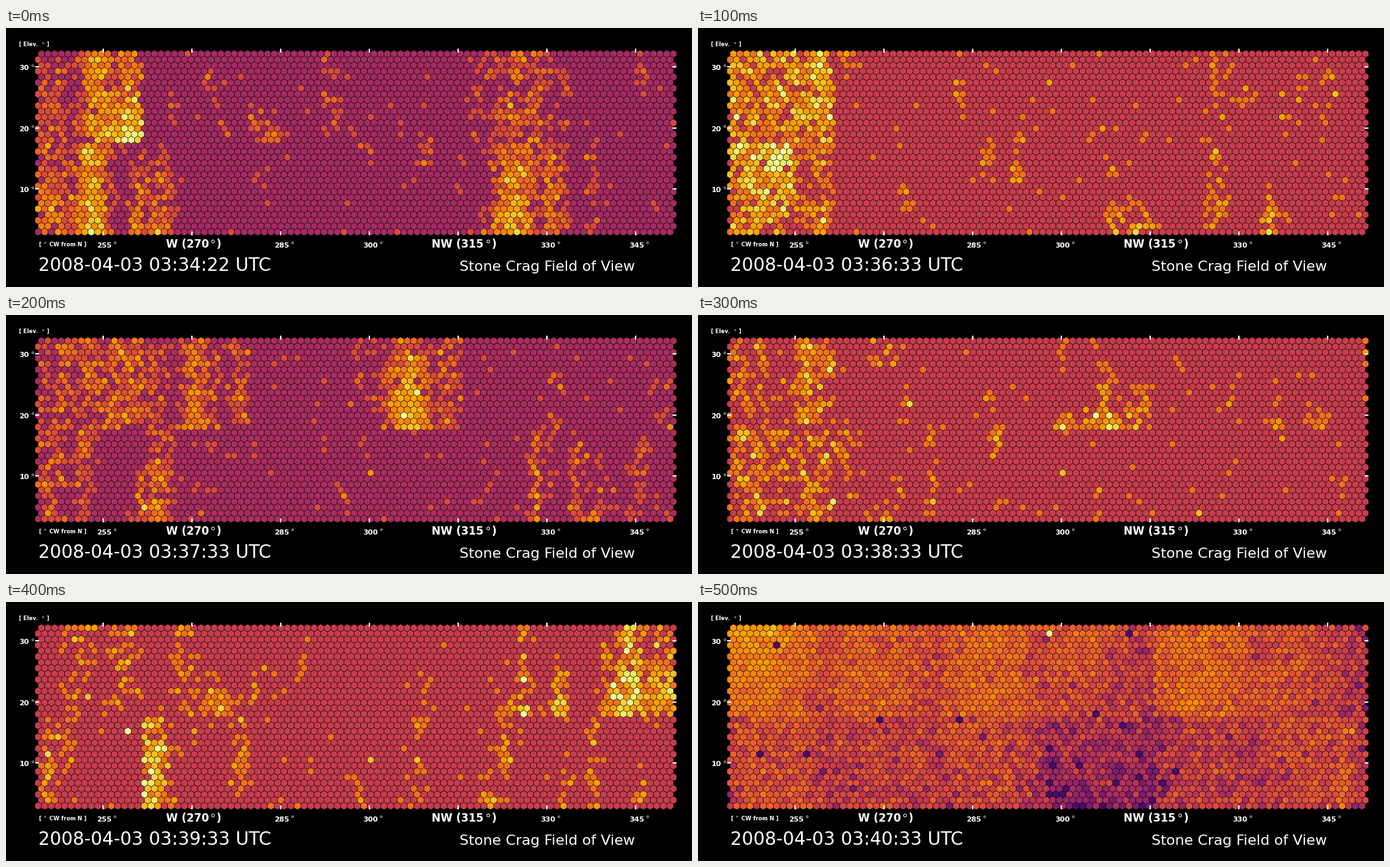
Animation of 1059 by 401 pixels, one loop 600 ms. Source, as a matplotlib script:

```python
import matplotlib.pyplot as plt
import numpy as np
from matplotlib.animation import FuncAnimation
from matplotlib.collections import PolyCollection
from matplotlib.patches import Rectangle

W, H, DPI = 1059, 401, 100
COLS, ROWS, DX, DY = 96, 32, 10.27, 8.89

plt.rcParams["font.family"] = "DejaVu Sans"

col, row = (g.ravel() for g in np.meshgrid(np.arange(COLS), np.arange(ROWS)))
cx = 49.5 + DX * (col + 0.5 * (row % 2 == 0))
cy = 40.1 + DY * row
camera, ring = col // 16, row // 16
depth = row % 16 / 15

scenes = []


def streak(half, x, w, a, b):
    """Band inside one camera, strength a at its top to b at its foot."""
    glow = np.maximum(a + (b - a) * depth, 0) * np.exp(-0.5 * ((cx - x) / w) ** 2)
    return glow * (ring == half) * (camera == int((x - 46) // (16 * DX)))


def wisps(rng, n):
    """Faint short clusters scattered over the field."""
    total = np.zeros(cx.size)
    for x, y in rng.uniform((220, 60), (1030, 310), (n, 2)):
        total += 0.7 * np.exp(-((cx - x) / 9) ** 2 - ((cy - y) / 25) ** 2)
    return total


def scene(clock, base, gain, upper, lower, peaks, sky=0.02, faint=16):
    rng = np.random.default_rng(40 + len(scenes))
    rate = sky + wisps(rng, faint)
    for half, bands in enumerate((upper, lower)):
        for band in bands:
            rate += streak(half, *band)
    count = rng.poisson(rate)
    for x, y, n in peaks:
        count[np.argmin((cx - x) ** 2 + (cy - y) ** 2)] = n
    level = base + gain * np.log(count + 1)
    scenes.append((f"2008-04-03 {clock} UTC", np.minimum(level, 0.985)))


scene("03:34:22", 0.44, 0.2,
      [(143, 14, 4, 4), (190, 15, 2, 6), (190, 17, -12, 8), (65, 20, 0.4, 2),
       (395, 20, -2, 1.5), (500, 12, 0.6, 0.5), (795, 28, 1.7, 1.8), (862, 8, 1, 0.5)],
      [(132, 13, 4, 7), (65, 16, 1.5, 2.8), (100, 15, 0.8, 1.4), (208, 11, 0.5, 3),
       (238, 13, 1, 2.5), (783, 17, 2.5, 7), (846, 12, 2.2, 2.5), (905, 6, 1, 1)],
      [(404, 218, 1), (378, 138, 3)])

scene("03:36:33", 0.53, 0.23,
      [(60, 18, 1.4, 1.4), (130, 20, 2.4, 0.8), (192, 15, 2.8, 2.2),
       (163, 16, 1.6, 0.6), (95, 14, 0.5, 0.9), (228, 8, 1, -1), (800, 14, 0.4, 0.4)],
      [(65, 20, 2, 1.3), (128, 17, 5, 0.5), (188, 18, 1, 0.9), (95, 16, 1.2, 0.8),
       (680, 18, -2, 1.6), (645, 9, -1, 0.9), (800, 9, 0.3, 0.8), (880, 7, -2, 2.4)],
      [(543, 84, 2), (399, 102, 2), (985, 102, 3), (625, 155, 2)])

scene("03:37:33", 0.45, 0.195,
      [(70, 22, 1.2, 1.1), (130, 17, 1.6, 1.4), (187, 23, 2.1, 1.8), (228, 14, 0.9, 0.9),
       (293, 18, 1.7, 2.3), (362, 9, 1, 1.8), (548, 9, 1.4, -0.5), (630, 13, 4, 8),
       (605, 14, 0.6, 3), (688, 13, 1.6, 1.6), (1014, 8, -0.6, 1.2)],
      [(70, 14, 1.5, 0.9), (116, 13, 2, 0.3), (235, 12, 1.1, 3.5), (208, 6, -1, 3),
       (818, 6, 2.2, 2.4), (877, 8, 1, 1.2), (908, 14, -0.5, 0.9), (973, 10, 0.5, 1.2)],
      [(615, 155, 16), (563, 245, 4), (214, 298, 9)])

scene("03:38:33", 0.53, 0.227,
      [(65, 9, 0.9, 0.9), (96, 9, 0.7, 0.6), (168, 17, 1.5, 0.9), (206, 6, 1.6, 0),
       (290, 16, 1, -0.5), (632, 9, -0.5, 2.4), (612, 25, -6, 2), (680, 11, -0.8, 1),
       (890, 11, -0.3, 0.8), (945, 14, -0.3, 0.7)],
      [(65, 13, 1.5, 0.8), (92, 11, 1, 0.9), (125, 13, 1.2, 0), (172, 16, 1.2, 0.9),
       (202, 9, 0.8, 0.6), (228, 12, 0.9, 0), (285, 15, -2, 1), (359, 7, 0.6, 0.6)],
      [(615, 155, 6), (563, 245, 3), (676, 173, 3), (773, 307, 3)])

scene("03:39:33", 0.53, 0.23,
      [(180, 15, 1, 0.6), (112, 16, 0.7, 0.3), (276, 12, 0.8, 0.5), (322, 13, -2, 1.7),
       (800, 8, 1, 1.6), (785, 17, -3, 1.5), (857, 8, -0.5, 1.8), (963, 12, 2.4, 3.4),
       (936, 11, 0, 2.8), (1020, 10, 0.8, 3.4), (995, 9, 0.7, 0.7)],
      [(62, 9, 1.4, 0.5), (92, 9, 1.1, 0), (213, 7, 1.8, 3), (234, 11, 1.6, 3.4),
       (362, 7, 1.2, 0.2), (637, 7, 0.2, 0.9), (740, 9, -1, 1), (907, 5, 0.5, 1)],
      [(188, 200, 6), (563, 245, 3), (398, 102, 2), (65, 236, 4)])

scene("03:40:33", 0.22, 0.165,
      [(85, 85, 25, 15), (270, 90, 12, 12), (440, 85, 13, 13.5),
       (570, 95, 11, 7), (770, 85, 14.5, 14.5), (875, 110, 10, 8)],
      [(110, 95, 9, 8), (290, 110, 6.5, 6), (435, 80, 9, 6.5),
       (620, 85, 4.5, 0.6), (805, 75, 6, 5.5), (945, 90, 7.5, 7), (996, 5, 6, 6)],
      [(543, 49, 90), (111, 49, 45), (1010, 200, 26), (121, 67, 0), (666, 49, 0),
       (404, 182, 0), (615, 173, 0), (96, 236, 0), (168, 236, 0)],
      sky=1.2, faint=0)

fig = plt.figure(figsize=(W / DPI, H / DPI), dpi=DPI, facecolor="black")
ax = fig.add_axes([0, 0, 1, 1])
ax.set(xlim=(0, W), ylim=(H, 0))
ax.axis("off")

turn = np.radians(np.arange(30, 390, 60))
hexagon = np.column_stack([np.cos(turn) * DX / 3 ** 0.5, np.sin(turn) * DY / 1.5])
verts = hexagon[None] + np.column_stack([cx, cy])[:, None]
cells = PolyCollection(verts, cmap="inferno", edgecolors="black", linewidths=0.35)
cells.set_clim(0, 1)
ax.add_collection(cells, autolim=False)
cells.set_clip_path(Rectangle((45, 32), 990, 289, transform=ax.transData))


def line(xs, ys):
    ax.plot(xs, ys, color="white", lw=1.5, solid_capstyle="butt", zorder=3)


def write(x, y, text, size, weight="bold"):
    return ax.text(x, y, text, size=size, weight=weight, color="white", va="baseline")


def degree(x, y, size):
    ax.plot(x, y, "o", ms=0.27 * size, mfc="none", mec="white", mew=0.06 * size)


for i in range(7):
    x = 150 + 137 * i
    line([x, x], [32, 37.6])
    line([x, x], [315.4, 321])
    if i not in (1, 4):
        write(x - 9.5, 339.5, str(255 + 15 * i), 8)
        degree(x + 17.5, 332, 8)

for i in range(3):
    y = 60 + 94.5 * i
    line([45, 50.6], [y, y])
    line([1029.4, 1035], [y, y])
    write(20.5, y + 5, str(30 - 10 * i), 8)
    degree(40.5, y - 2.5, 8)

for x, text, dot in ((247, "W (270", 319), (657, "NW (315", 744)):
    write(x, 340, text, 12)
    degree(dot, 330, 12)
    write(dot + 5.8, 340, ")", 12)

write(20.5, 28, "[ Elev.", 6)
degree(56.5, 22.5, 6)
write(62, 28, "]", 6)
write(50.5, 337.5, "[", 6)
degree(60, 332, 6)
write(67, 337.5, "CW from N ]", 6)

clock = write(50, 376, "", 20, "normal")
write(700, 376, "Stone Crag Field of View", 16, "normal")


def draw(i):
    stamp, level = scenes[i % len(scenes)]
    clock.set_text(stamp)
    cells.set_array(level)
    return cells, clock


anim = FuncAnimation(fig, draw, frames=len(scenes), init_func=lambda: draw(0),
                     interval=100, repeat=True, repeat_delay=0)
plt.show()
```
